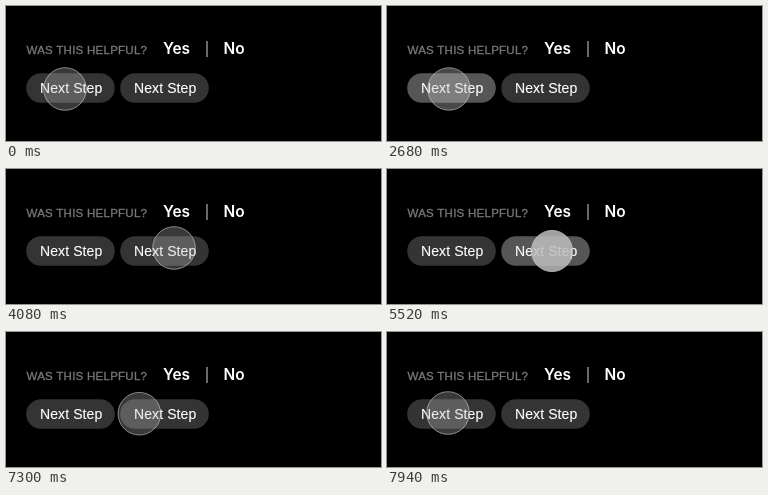
Write an HTML page that moves like this. It is 375 px wide and 135 px high and loops after 8000 ms.

```html
<!DOCTYPE html>
<html lang="en">
<head>
<meta charset="utf-8">
<title>Was this helpful?</title>
<style>
  html, body { margin: 0; width: 100%; height: 100%; overflow: hidden; background: #000; }
  svg { display: block; }
  text { fill: #fff; }
  .label { font: 11.5px "Liberation Sans", Arial, sans-serif; letter-spacing: .26px; fill: #777; stroke: #777; stroke-width: .35px; }
  .answer { font: 600 15.4px Inter, "Liberation Sans", sans-serif; }
  .step { font: 14px "Liberation Sans", Arial, sans-serif; letter-spacing: .1px; stroke: #fff; stroke-width: .15px; }
</style>
</head>
<body>
<svg width="375" height="135" viewBox="0 0 375 135">
  <text class="label" x="20.5" y="47.7">WAS THIS HELPFUL?</text>
  <text class="answer" x="157" y="48">Yes</text>
  <rect x="200.5" y="35" width="1" height="16" fill="#d0d0d0"/>
  <text class="answer" x="217.6" y="48">No</text>
  <rect class="pill" x="20.2" y="67.2" width="88.6" height="29.6" rx="14.8"/>
  <text class="step" x="34" y="87">Next Step</text>
  <rect class="pill" x="114.2" y="67.2" width="88.6" height="29.6" rx="14.8"/>
  <text class="step" x="128" y="87">Next Step</text>
  <circle id="cursor" fill="#bebebe" stroke="#d0d0d0" stroke-opacity=".6"/>
</svg>
<script>
const LOOP = 8000, REST = 0.3;
const cursor = document.getElementById('cursor');
const pills = document.querySelectorAll('.pill');

// start, end, target x, target y, vertical bow of the path
const moves = [
  [200, 340, 62, 83, 0],
  [3320, 4080, 168, 79, 0.7],
  [4360, 4500, 165, 82, 0],
  [7100, 7920, 61, 81, 0]
];

// delay, cursor opacity, pill highlight
const pressSteps = [[0, 0.5, 0.5], [80, 0.7, 0.8], [200, 0.85, 1]];
const releaseSteps = [[0, 0.38, 1], [80, 0.32, 0.5], [200, REST, 0]];
// press and release time for each pill
const clicks = [[1680, 2680], [5320, 6300]];

const bezier = (s, a, b) => 3 * (1 - s) ** 2 * s * a + 3 * (1 - s) * s * s * b + s ** 3;

function ease(t) {
  let lo = 0, hi = 1;
  for (let i = 0; i < 20; i++) {
    const mid = (lo + hi) / 2;
    if (bezier(mid, 0.17, 0.67) < t) lo = mid; else hi = mid;
  }
  return bezier(lo, 0.15, 1);
}

function position(t) {
  let x = 59, y = 83;
  for (const [start, end, toX, toY, bow] of moves) {
    if (t < start) break;
    const k = t >= end ? 1 : ease((t - start) / (end - start));
    x += (toX - x) * k;
    y += (toY - y) * k + 4 * bow * k * (1 - k);
  }
  return [x, y];
}

function draw(now) {
  const t = now % LOOP;
  const [x, y] = position(t);
  let opacity = REST;
  clicks.forEach(([press, release], i) => {
    const [start, steps] = t < release ? [press, pressSteps] : [release, releaseSteps];
    let glow = 0;
    for (const [delay, alpha, level] of steps) {
      if (t >= start + delay) [opacity, glow] = [alpha, level];
    }
    const grey = Math.round(52 + 34 * glow);
    pills[i].setAttribute('fill', `rgb(${grey},${grey},${grey})`);
  });
  cursor.setAttribute('cx', x);
  cursor.setAttribute('cy', y);
  cursor.setAttribute('r', 21.3 - 1.2 * (opacity - REST));
  cursor.setAttribute('fill-opacity', opacity);
  requestAnimationFrame(() => draw(performance.now()));
}
draw(performance.now());
</script>
</body>
</html>
```
